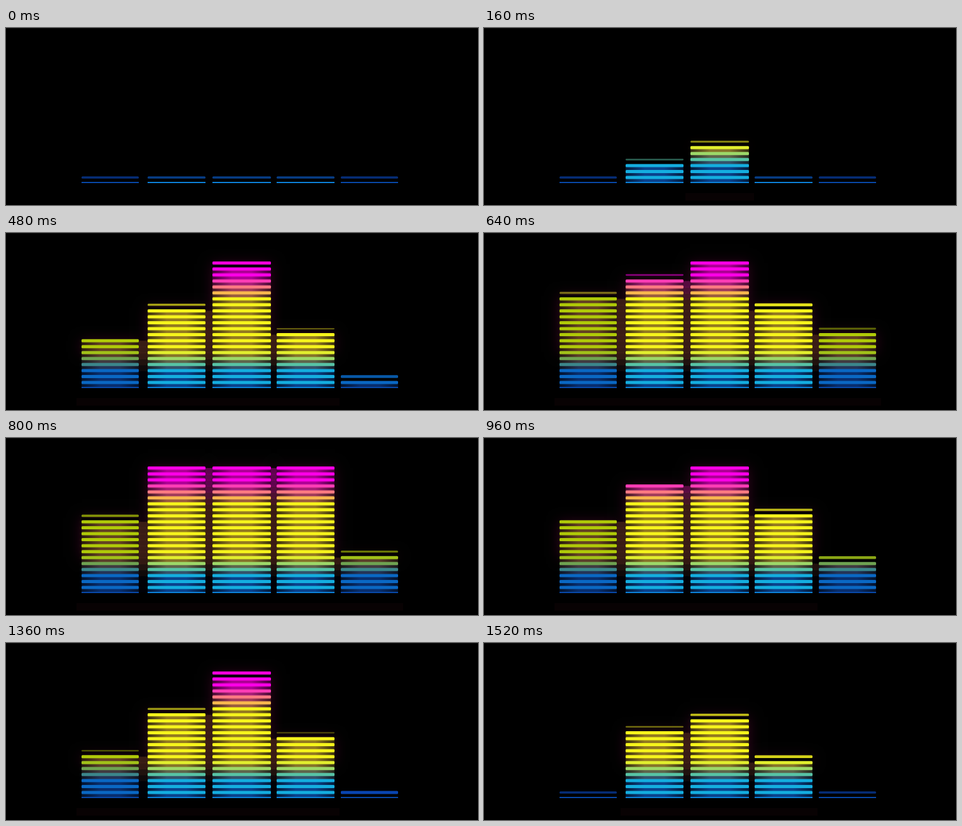
An HTML page with a canvas that plays this animation: 750x283 px, repeating every 1.6 s.

```html
<!DOCTYPE html>
<html lang="en">
<head>
<meta charset="utf-8">
<title>Equalizer</title>
<style>
  html, body { margin: 0; width: 100%; height: 100%; overflow: hidden; background: #000; }
  canvas { display: block; }
</style>
</head>
<body>
<canvas width="750" height="283"></canvas>
<script>
const ctx = document.querySelector('canvas').getContext('2d');
const LOOP = 1600, STEP = 80;
const BASE = 239, PITCH = 9.55, FLOOR = 247, TOP_ROW = 20, REST = -.5;

// Colours run from low rows through middle rows to high rows.
const strong = {
  line: [[20, 174, 224], [246, 244, 28], [255, 0, 232]],
  gap: [[10, 66, 140], [148, 122, 32], [176, 0, 150]],
  rest: '#0c60d0', floor: '#0c80d8'
};
const weak = {
  line: [[10, 104, 196], [176, 202, 8], [176, 40, 120]],
  gap: [[8, 46, 110], [100, 66, 34], [128, 16, 96]],
  rest: '#0a48b8', floor: '#0848a8'
};
const between = [[0, 2, 8], [70, 36, 24], [120, 4, 100]];

const clamp = (v, min, max) => Math.min(max, Math.max(min, v));
const ramp = (v, from, to) => clamp((v - from) / (to - from), 0, 1);
const mix = (a, b, p) => a.map((v, i) => v + (b[i] - v) * p);
const rowY = row => BASE - row * PITCH;

function rowColor([low, middle, high], row) {
  const color = mix(mix(low, middle, ramp(row, 2, 5.3)), high, ramp(row, 14, 18));
  return `rgb(${color.map(Math.round)})`;
}

function follow(keys, t) {
  const i = clamp(keys.findIndex(key => key[0] >= t), 1, keys.length - 1);
  const [t0, a] = keys[i - 1], [t1, b] = keys[i];
  return a + (b - a) * ramp(t, t0, t1);
}

// Levels in rows; they are clipped between REST and TOP_ROW.
const outer = t => follow([[320, REST], [640, 14.5], [800, 11.6], [960, 11], [1200, 12.8], [1520, REST]], t);
const inner = t => follow([[80, REST], [320, 7.7], [640, 17.3], [800, 24.4], [960, 17], [1200, 16.7], [1520, 10.2]], t);
const middle = t => t < 160 ? REST : 40 - .0456 * Math.abs(t - 920);

const bars = [
  { x: 120, w: 91, tone: weak, level: outer },
  { x: 225, w: 92, tone: strong, level: inner },
  { x: 328, w: 93, tone: strong, level: middle },
  { x: 430, w: 92, tone: strong, level: t => inner(t) - 4.4 },
  { x: 532, w: 91, tone: weak, level: t => outer(t) - 6.2 }
];

function fillRows(colors, x, w, h) {
  for (let row = 0; row <= h; row++) {
    const y = rowY(row);
    ctx.fillStyle = rowColor(colors, row);
    ctx.fillRect(x, y, w, Math.min(PITCH + 1, FLOOR - y));
  }
}

function drawGlow({ x, w }, h) {
  if (h <= 5) return;
  const top = rowY(h);
  ctx.fillStyle = '#080203';
  ctx.fillRect(x - 8, 264, w + 16, 12);
  ctx.fillStyle = '#000';
  ctx.shadowColor = '#30041c';
  ctx.shadowBlur = 20;
  ctx.fillRect(x, top, w, rowY(5) - top);
  ctx.shadowBlur = 0;
}

function drawBar({ x, w, tone }, h) {
  if (h > 0) {
    fillRows(tone.gap, x, w, h);
    const shade = ctx.createLinearGradient(x, 0, x + w, 0);
    ['#0009', '#0000', '#0000', '#0009'].forEach((c, i) => shade.addColorStop(i / 3, c));
    ctx.fillStyle = shade;
    ctx.fillRect(x, rowY(h), w, FLOOR - rowY(h));
  }
  for (let row = 0; row < h + 1; row++) {
    const lit = Math.min(1, h - row + 1);
    const height = 2 + 3 * lit;
    ctx.globalAlpha = .3 + .7 * lit;
    ctx.fillStyle = h < 0 ? tone.rest : rowColor(tone.line, row);
    ctx.beginPath();
    ctx.roundRect(x, rowY(row) - height / 2, w, height, 1.5);
    ctx.fill();
  }
  ctx.globalAlpha = 1;
  ctx.fillStyle = tone.floor;
  ctx.fillRect(x, FLOOR - 1, w, 2);
}

function draw(now) {
  const t = Math.floor(now % LOOP / STEP) * STEP;
  const levels = bars.map(bar => clamp(bar.level(t), REST, TOP_ROW));
  ctx.fillStyle = '#000';
  ctx.fillRect(0, 0, 750, 283);
  ctx.fillStyle = '#0b0b0b';
  ctx.fillRect(0, 0, 750, 1);
  bars.forEach((bar, i) => drawGlow(bar, levels[i]));
  bars.slice(1).forEach((bar, i) => {
    const left = bars[i].x + bars[i].w;
    ctx.globalAlpha = .75;
    fillRows(between, left, bar.x - left, Math.min(levels[i], levels[i + 1]));
    ctx.globalAlpha = 1;
  });
  bars.forEach((bar, i) => drawBar(bar, levels[i]));
}

const start = performance.now();
function tick() {
  draw(performance.now() - start);
  requestAnimationFrame(tick);
}
tick();
</script>
</body>
</html>
```
